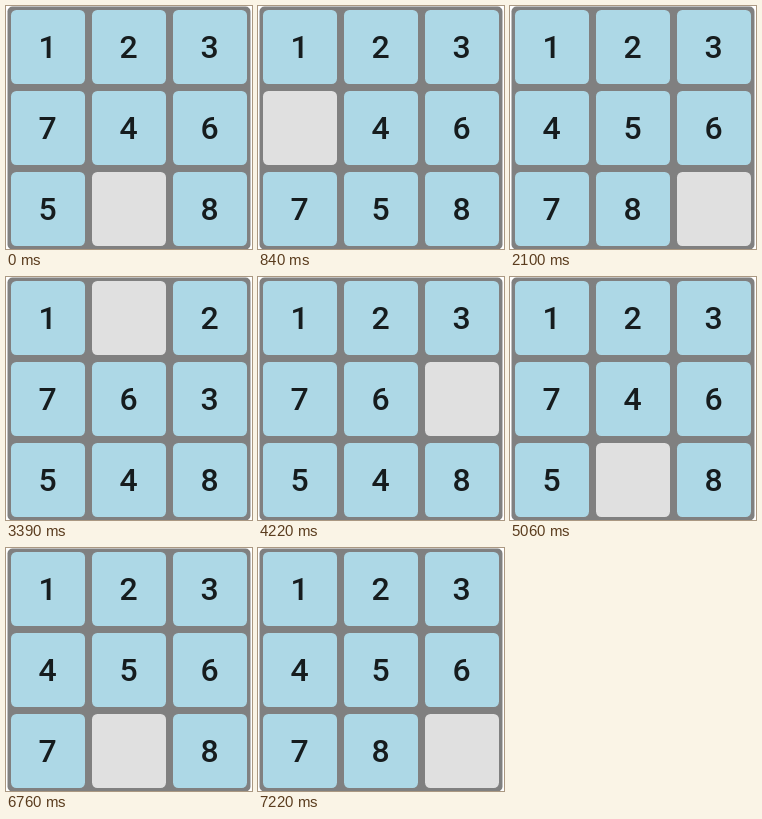
These frames come from a looping animation (246 px wide and 243 px high, 7.96 s). An HTML page:

```html
<!DOCTYPE html>
<html lang="en">
<head>
<meta charset="utf-8">
<title>Sliding puzzle</title>
<style>
  html, body { margin: 0; width: 100%; height: 100%; overflow: hidden; background: #fff; }
  svg { display: block; width: 246px; height: 243px; overflow: hidden; }
  text {
    font: 450 32px Roboto, sans-serif; text-anchor: middle;
    fill: rgba(0, 0, 0, .87);
  }
</style>
</head>
<body>
<svg viewBox="0 0 246 243">
  <rect x="1.5" y=".5" width="243" height="243" rx="5" fill="#808080"/>
</svg>
<script>
const LOOP = 7960, BEAT = 425, PITCH = 81, SIZE = 74;
const SOLVED = "12345678 ";
const GAP_PATH = "8743674521"; // the gap's route, walked backwards from the solved board
const svg = document.querySelector("svg");

function add(name, attrs) {
  const el = document.createElementNS(svg.namespaceURI, name);
  for (const key in attrs) el.setAttribute(key, attrs[key]);
  return svg.appendChild(el);
}

const cells = [...SOLVED].map((_, i) => {
  const x = 5 + PITCH * (i % 3), y = 4 + PITCH * Math.floor(i / 3);
  return {
    tile: add("rect", { x, y, width: SIZE, height: SIZE, rx: 5.4 }),
    label: add("text", { x: x + SIZE / 2 - .5, y: y + 48 })
  };
});

// Two rounds: a short one, then a longer one from a fresh shuffle.
function movesLeft(t) {
  const solvedAt = t < 3390 ? 2080 : 7185;
  return Math.max(0, Math.ceil((solvedAt - t) / BEAT));
}

function layout(moves) {
  const tiles = [...SOLVED];
  for (let i = 0; i < moves; i++) {
    const gap = GAP_PATH[i], next = GAP_PATH[i + 1];
    [tiles[gap], tiles[next]] = [tiles[next], tiles[gap]];
  }
  return tiles;
}

function draw(t) {
  const tiles = layout(movesLeft(t));
  cells.forEach(({ tile, label }, i) => {
    label.textContent = tiles[i].trim();
    tile.setAttribute("fill", tiles[i] === " " ? "#e0e0e0" : "#add8e6");
  });
}

const begin = performance.now();
function tick() {
  draw((performance.now() - begin) % LOOP);
  requestAnimationFrame(tick);
}
tick();
</script>
</body>
</html>
```
